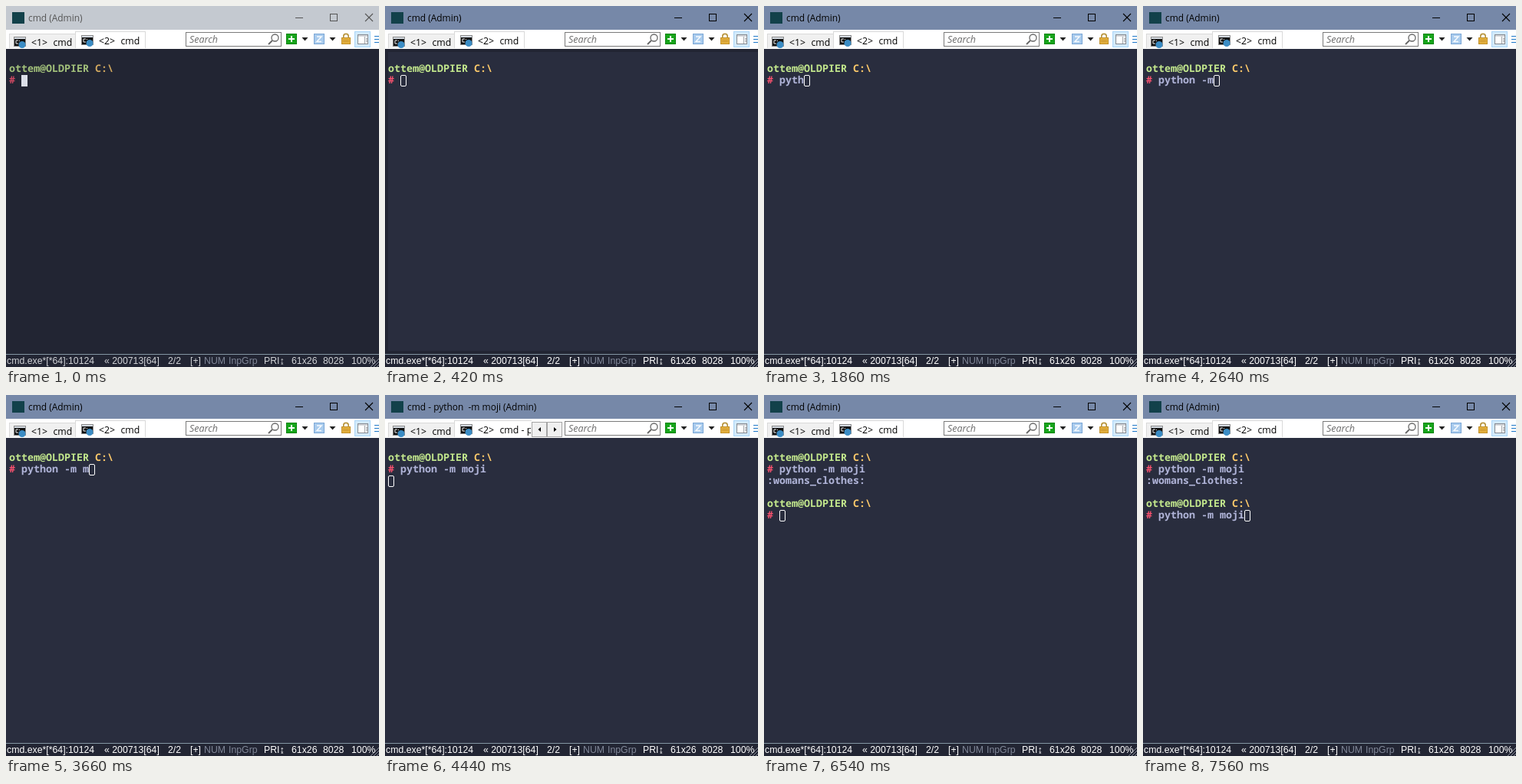
Write an HTML page with a canvas that moves like this. It is 486 by 471 pixels and loops after 8 s.

```html
<!DOCTYPE html>
<html lang="en">
<head>
<meta charset="utf-8">
<title>Terminal session</title>
<style>
html, body { margin: 0; width: 100%; height: 100%; overflow: hidden; background: #292d3e; }
canvas, svg { position: absolute; left: 0; top: 0; width: 486px; height: 471px; display: block; }
text { white-space: pre; }
.ui { font-family: "Open Sans", "Noto Sans", sans-serif; }
.bar { font: 12.3px "Liberation Sans", Arial, sans-serif; }
.term { font: 600 13.333px "Noto Sans Mono", "DejaVu Sans Mono", monospace; fill: #b0b4d8; text-rendering: geometricPrecision; }
.user { fill: #c3e88d; }
.path { fill: #ffcb6b; }
.hash { fill: #ff5370; }
</style>
</head>
<body>
<canvas id="view" width="486" height="471"></canvas>
<svg viewBox="0 0 486 471">
  <clipPath id="tabClip"><rect x="0" y="31" width="190" height="25"/></clipPath>
  <g class="ui">
    <text id="title" x="29" y="20" font-size="11.95"></text>
    <g font-size="12.3" fill="#000" clip-path="url(#tabClip)">
      <text x="33" y="52">&lt;1&gt;</text><text x="61.5" y="52">cmd</text>
      <text x="121" y="50">&lt;2&gt;</text><text id="tab" x="149.5" y="50">cmd</text>
    </g>
    <text x="239" y="48" font-size="12.5" font-style="italic" fill="#6d6d6d">Search</text>
  </g>
  <g id="term" class="term"></g>
  <g id="status" class="bar"></g>
</svg>
<script>
const LOOP = 8000;
const COL = 8, ROW = 15, LEFT = 4, TOP = 60;
const CMD = "python -m moji";
const KEYS = [1560, 1620, 1740, 1860, 1980, 2040, 2160, 2460, 2640, 3180, 3660, 3780, 3960, 4080];
const HIDDEN = [[900, 1440], [4980, 5520], [6000, 6540], [7020, 7500]];
const FOCUS = 420, FULL = 480, ENTER = 4380, RUN = 4440, DONE = 4500, RECALL = 7560;
const DARK = "#222533", BG = "#292d3e";

const ctx = document.getElementById("view").getContext("2d");
const byId = id => document.getElementById(id);

function addText(parent, x, y, cls) {
  const el = document.createElementNS("http://www.w3.org/2000/svg", "text");
  el.setAttribute("x", x);
  el.setAttribute("y", y);
  if (cls) el.setAttribute("class", cls);
  parent.appendChild(el);
  return el;
}

function put(el, s) {
  if (el.textContent !== s) el.textContent = s;
}

const cell = (row, col, cls) => addText(byId("term"), LEFT + col * COL, TOP + row * ROW + 11, cls);

function makePrompt(row) {
  const parts = [cell(row, 0, "user"), cell(row, 14, "path"), cell(row + 1, 0, "hash"), cell(row + 1, 2)];
  return (shown, typed) => ["ottem@OLDPIER", "C:\\", "#", typed]
    .forEach((s, i) => put(parts[i], shown ? s : ""));
}

const first = makePrompt(1), second = makePrompt(5), output = cell(3, 0);

const STATUS = [[1, "cmd.exe*[*64]:10124"], [128, "« 200713[64]"], [211, "2/2"], [240, "[+]"],
  [258, "NUM", 1], [290, "InpGrp", 1], [336, "PRI↨"], [372, "61x26"], [413, "8028"], [450, "100%"]];
for (const [x, s, off] of STATUS) {
  const el = addText(byId("status"), x, 467);
  el.textContent = s;
  if (off) el.setAttribute("fill", "#808798");
}

function box(x, y, w, h, fill, line) {
  if (fill) { ctx.fillStyle = fill; ctx.fillRect(x, y, w, h); }
  if (line) { ctx.strokeStyle = line; ctx.lineWidth = 1; ctx.strokeRect(x + .5, y + .5, w - 1, h - 1); }
}

function path(points, color, width) {
  ctx.beginPath();
  points.forEach(([x, y]) => ctx.lineTo(x, y));
  if (width) {
    ctx.strokeStyle = color;
    ctx.lineWidth = width;
    ctx.stroke();
  } else {
    ctx.fillStyle = color;
    ctx.fill();
  }
}

function disc(x, y, r, fill) {
  ctx.beginPath();
  ctx.arc(x, y, r, 0, 7);
  ctx.fillStyle = fill;
  ctx.fill();
}

function titleBar(active) {
  box(0, 0, 486, 31, active ? "#7688a8" : "#c4c9d0");
  box(8, 8, 16, 15, "#12414a");
  const ink = active ? "#000" : "#555";
  box(377, 15, 10, 1, ink);
  box(422, 10, 10, 10, null, ink);
  path([[468, 10], [478, 20]], ink, 1.1);
  path([[478, 10], [468, 20]], ink, 1.1);
}

function tabIcon(x, y) {
  box(x, y, 16, 13, "#101010", "#8b8b8b");
  box(x + 1, y + 1, 14, 2, "#d5dbe2");
  path([[x + 6, y + 5], [x + 3, y + 5], [x + 3, y + 9], [x + 6, y + 9]], "#eee", 1);
  box(x + 7, y + 5, 1, 1, "#eee");
  box(x + 7, y + 8, 1, 1, "#eee");
  disc(x + 11, y + 10.5, 4.5, "#3b8cc4");
}

function drop(x) {
  path([[x, 41], [x + 8, 41], [x + 4, 45.5]], "#222");
}

function toolBar(running) {
  box(0, 31, 486, 25, "#fff");
  box(4, 36, 87, 20, "#f0f0f0", "#d9d9d9");
  box(90, 33, running ? 110 : 92, 24, "#fff", "#d9d9d9");
  box(0, 55, 486, 1, "#fff");
  tabIcon(10, 40);
  tabIcon(98, 38);
  if (running) {
    box(191, 31, 43, 25, "#fff");
    box(191, 35, 20, 20, "#f0f0f0", "#a5a5a5");
    box(211, 35, 20, 20, "#f0f0f0", "#a5a5a5");
    path([[203, 42], [203, 48], [199.5, 45]], "#000");
    path([[220, 42], [220, 48], [223.5, 45]], "#000");
  }
  box(234, 34, 125, 19, "#fff", "#7a7a7a");
  ctx.beginPath();
  ctx.arc(350.5, 41.5, 4.5, 0, 7);
  ctx.strokeStyle = "#666";
  ctx.lineWidth = 1.3;
  ctx.stroke();
  path([[347, 45], [342, 50]], "#666", 1.8);

  box(365, 36, 14, 14, "#16a51b", "#0b8411");
  box(371, 39, 2, 8, "#fff");
  box(368, 42, 8, 2, "#fff");
  drop(385.5);
  box(401, 36, 14, 14, "#a9cbed", "#7ba7d6");
  path([[405, 40], [411, 40], [405, 46.5], [411, 46.5]], "#f7fbff", 1.5);
  drop(421.5);

  ctx.beginPath();
  ctx.arc(443, 39.5, 3.2, Math.PI, 0);
  ctx.lineTo(446.2, 43);
  ctx.moveTo(439.8, 39.5);
  ctx.lineTo(439.8, 43);
  ctx.strokeStyle = "#b8953f";
  ctx.lineWidth = 1.7;
  ctx.stroke();
  box(437, 41, 12, 9, "#e5b13d", "#c08f2a");
  for (const y of [44, 46]) box(439, y, 8, 1, "#c99630");

  box(454, 33, 21, 21, "#d3eafc", "#a9d6f8");
  box(458, 37, 14, 13, "#fff", "#85898f");
  box(459, 38, 12, 2, "#d5d8dc");
  box(467, 40, 1, 9, "#a0a4a9");
  for (const y of [42, 44, 46]) box(469, y, 2, 1, "#a0a4a9");
  for (const y of [39, 43, 47]) box(480, y, 6, 1, "#1f78c8");
}

function statusBar() {
  box(0, 454, 486, 17, DARK);
  box(0, 454, 486, 1, "#8496a3");
  for (const d of [3, 7, 11]) path([[486 - d, 471], [486, 471 - d]], "#8b909c", 1);
}

function cursor(row, col, active) {
  const x = LEFT + col * COL, y = TOP + row * ROW;
  if (!active) return box(x, y, COL, ROW, "#dcdfe9");
  ctx.beginPath();
  ctx.roundRect(x + .5, y + .5, COL - 1, ROW - 1, 1.5);
  ctx.strokeStyle = "#fff";
  ctx.lineWidth = 1;
  ctx.stroke();
}

function render(t) {
  const active = t >= FOCUS, running = t >= RUN && t < DONE, done = t >= DONE;
  const typed = KEYS.filter(k => t >= k).length;
  const recalled = t >= RECALL ? CMD : "";

  titleBar(active);
  toolBar(running);
  box(0, 56, 486, 398, t < FULL ? DARK : BG);
  if (active && t < FULL) box(LEFT, TOP, 482, 390, BG);
  statusBar();

  if (!HIDDEN.some(([a, b]) => t >= a && t < b)) {
    if (done) cursor(6, 2 + recalled.length, true);
    else if (t >= ENTER) cursor(3, 0, true);
    else cursor(2, 2 + typed, active);
  }

  put(byId("title"), running ? "cmd - python  -m moji (Admin)" : "cmd (Admin)");
  byId("title").setAttribute("fill", active ? "#000" : "#555");
  put(byId("tab"), running ? "cmd - python" : "cmd");
  byId("term").setAttribute("opacity", active ? 1 : .8);
  byId("status").setAttribute("fill", active ? "#fff" : "#d0d2d6");
  first(true, CMD.slice(0, typed));
  put(output, done ? ":womans_clothes:" : "");
  second(done, recalled);
}

const start = performance.now();
function tick() {
  render((performance.now() - start) % LOOP);
  requestAnimationFrame(tick);
}
tick();
</script>
</body>
</html>
```
